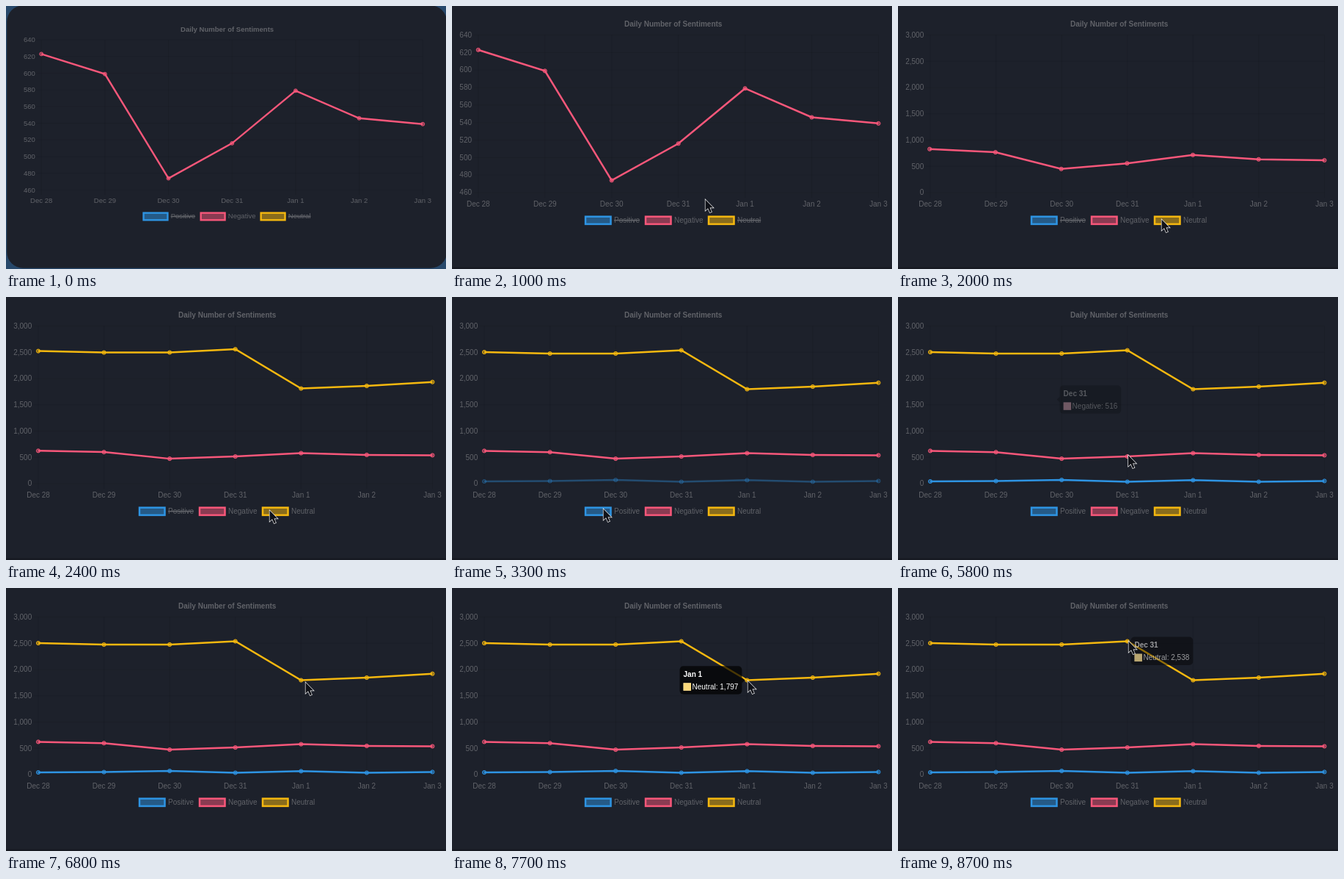
Write an HTML page with a canvas that moves like this. It is 600 px wide and 358 px high and loops after 8800 ms.

```html
<!DOCTYPE html>
<html lang="en">
<head>
<meta charset="utf-8">
<title>Daily Number of Sentiments</title>
<style>
html, body { margin: 0; width: 100%; height: 100%; overflow: hidden; background: #1d212b; }
canvas { display: block; width: 600px; height: 358px; }
</style>
</head>
<body>
<canvas id="stage" width="600" height="358"></canvas>
<script>
const ctx = document.getElementById('stage').getContext('2d');
const LOOP = 8800, STEP = 100;
const SHOW_NEUTRAL = 1560, SHOW_POSITIVE = 3190;
const TOP = 39.5, BOTTOM = 254, RIGHT = 581.5;
const FONT = '10px "Liberation Sans", Arial, sans-serif';
const TEXT = '#616369';

const days = ['Dec 28', 'Dec 29', 'Dec 30', 'Dec 31', 'Jan 1', 'Jan 2', 'Jan 3'];
const positive = { name: 'Positive', rgb: '46,148,227', x: 181, shownAt: SHOW_POSITIVE,
  values: [42, 48, 70, 35, 65, 35, 50] };
const negative = { name: 'Negative', rgb: '248,87,122', x: 263, shownAt: -Infinity,
  values: [623, 599, 474, 516, 579, 546, 539] };
const neutral = { name: 'Neutral', rgb: '245,184,15', x: 349, shownAt: SHOW_NEUTRAL,
  values: [2503, 2475, 2476, 2538, 1797, 1846, 1920] };
const series = [positive, negative, neutral];

const narrow = { min: 460, max: 640, step: 20, left: 35.8 };
const wide = { min: 0, max: 3000, step: 500, left: 44 };

// Pointer stops: time, x, y
const pointerPath = [
  [600, 333, 232], [1000, 345, 263], [1400, 359, 290], [2500, 359, 290],
  [3000, 206, 288], [4350, 206, 288], [5000, 44, 75], [5250, 44, 75],
  [5400, 134, 77], [5540, 134, 77], [5745, 313.5, 215], [6350, 313.5, 215],
  [6800, 408, 128], [6900, 403, 126], [8250, 403, 126], [8583, 314, 72]
];
const hovers = [
  { from: 5000, to: 5250, set: neutral, day: 0 },
  { from: 5400, to: 5545, set: neutral, day: 1 },
  { from: 5745, to: 6350, set: negative, day: 3 },
  { from: 6900, to: 8250, set: neutral, day: 4 },
  { from: 8583, to: LOOP, set: neutral, day: 3 }
];

const clamp = v => Math.min(1, Math.max(0, v));
const mix = (a, b, p) => a + (b - a) * p;
const smooth = p => p * p * (3 - 2 * p);
const outQuart = p => 1 - (1 - clamp(p)) ** 4;
const color = (set, alpha = 1) => `rgba(${set.rgb},${alpha})`;
const scaleX = (scale, day) => mix(scale.left, RIGHT, day / 6);
const scaleY = (scale, v) => mix(BOTTOM, TOP, (v - scale.min) / (scale.max - scale.min));

function text(str, x, y, align = 'left', fill = TEXT, bold = false) {
  ctx.font = (bold ? 'bold ' : '') + FONT;
  ctx.textAlign = align;
  ctx.textBaseline = 'middle';
  ctx.fillStyle = fill;
  ctx.fillText(str, x, y + 0.5);
}

function segment(x1, y1, x2, y2, stroke, width) {
  ctx.strokeStyle = stroke;
  ctx.lineWidth = width;
  ctx.beginPath();
  ctx.moveTo(x1, y1);
  ctx.lineTo(x2, y2);
  ctx.stroke();
}

function drawAxes(scale) {
  const grid = 'rgba(0,0,0,.1)';
  for (let v = scale.min; v <= scale.max; v += scale.step) {
    const y = scaleY(scale, v);
    segment(scale.left - 7, y, RIGHT, y, grid, 0.85);
    text(v.toLocaleString('en-US'), scale.left - 8.8, y, 'right');
  }
  days.forEach((day, i) => {
    const x = scaleX(scale, i);
    segment(x, TOP, x, BOTTOM + 7, grid, 0.85);
    text(day, x, 269.5, 'center');
  });
}

function drawLegend(t) {
  for (const set of series) {
    ctx.fillStyle = color(set, 0.5);
    ctx.strokeStyle = color(set);
    ctx.lineWidth = 2.5;
    ctx.fillRect(set.x + 1, 286.7, 34.5, 10.2);
    ctx.strokeRect(set.x + 1, 286.7, 34.5, 10.2);
    text(set.name, set.x + 40, 291.5);
    if (t < set.shownAt) {
      const end = set.x + 40 + ctx.measureText(set.name).width;
      segment(set.x + 40, 291.8, end, 291.8, TEXT, 1.6);
    }
  }
}

function drawSeries(set, t) {
  if (t < set.shownAt) return;
  const move = outQuart((t - SHOW_NEUTRAL) / 1000);
  const alpha = outQuart((t - set.shownAt) / 1000);
  const points = set.values.map((v, i) => [
    mix(scaleX(narrow, i), scaleX(wide, i), move),
    mix(scaleY(narrow, v), scaleY(wide, v), move)
  ]);
  ctx.save();
  ctx.beginPath();
  ctx.rect(0, TOP - 1.3, 600, BOTTOM - TOP + 2.6);
  ctx.clip();
  ctx.strokeStyle = color(set, alpha);
  ctx.lineWidth = 2.5;
  ctx.beginPath();
  points.forEach(([x, y]) => ctx.lineTo(x, y));
  ctx.stroke();
  ctx.restore();

  ctx.fillStyle = color(set, alpha / 2);
  ctx.strokeStyle = color(set, alpha);
  ctx.lineWidth = 0.9;
  for (const [x, y] of points) {
    if (y < TOP - 1) continue;
    ctx.beginPath();
    ctx.arc(x, y, 2.6, 0, Math.PI * 2);
    ctx.fill();
    ctx.stroke();
  }
}

function tooltipBox({ set, day }) {
  const label = `${set.name}: ${set.values[day].toLocaleString('en-US')}`;
  ctx.font = FONT;
  const w = ctx.measureText(label).width + 22, h = 38.5;
  const onRight = day <= 3;
  const x = scaleX(wide, day) + (onRight ? 7 : -7 - w);
  return { label, w, h, onRight, x, y: scaleY(wide, set.values[day]) - h / 2 };
}

function drawTooltip(t) {
  const index = hovers.findLastIndex(h => t >= h.from);
  if (index < 0) return;
  const hover = hovers[index];
  const opacity = clamp((t - hover.from) / 200) * clamp(1 - (t - hover.to) / 200);
  if (!opacity) return;

  const box = tooltipBox(hover);
  const start = index ? tooltipBox(hovers[index - 1]) : box;
  const p = outQuart((t - hover.from) / 400);
  const x = mix(start.x, box.x, p), y = mix(start.y, box.y, p);
  const edge = box.onRight ? x : x + box.w, dir = box.onRight ? -1 : 1;

  ctx.save();
  ctx.globalAlpha = opacity;
  ctx.fillStyle = 'rgba(0,0,0,.7)';
  ctx.beginPath();
  ctx.roundRect(x, y, box.w, box.h, 5);
  ctx.fill();
  ctx.beginPath();
  ctx.moveTo(edge, y + box.h / 2 - 4);
  ctx.lineTo(edge + dir * 4, y + box.h / 2);
  ctx.lineTo(edge, y + box.h / 2 + 4);
  ctx.fill();
  text(days[hover.day], x + 5, y + 11, 'left', '#fff', true);
  ctx.fillStyle = '#fff';
  ctx.fillRect(x + 5, y + 23, 10.5, 10.5);
  ctx.fillStyle = color(hover.set, 0.55);
  ctx.fillRect(x + 5, y + 23, 10.5, 10.5);
  text(box.label, x + 17, y + 28, 'left', '#fff');
  ctx.restore();
}

function drawPointer(t) {
  if (t < pointerPath[0][0]) return;
  const i = pointerPath.findLastIndex(k => t >= k[0]);
  const a = pointerPath[i], b = pointerPath[i + 1] || a;
  const p = b === a ? 0 : smooth((t - a[0]) / (b[0] - a[0]));
  ctx.save();
  ctx.translate(mix(a[1], b[1], p), mix(a[2], b[2], p));
  ctx.fillStyle = '#101218';
  ctx.strokeStyle = '#fff';
  ctx.lineWidth = 1.3;
  ctx.stroke(arrow);
  ctx.fill(arrow);
  ctx.restore();
}
const arrow = new Path2D('M.5 .5V15.5L4 12.3 6.6 18.2 9 17.1 6.5 11.5H11.3Z');

function draw(t) {
  const zoom = smooth(clamp(t / 1000));
  const size = mix(0.953, 1, zoom);
  const scale = t < SHOW_NEUTRAL ? narrow : wide;

  ctx.fillStyle = '#27486b';
  ctx.fillRect(0, 0, 600, 358);
  ctx.save();
  ctx.translate(300, 179);
  ctx.scale(size, size);
  ctx.translate(-300, -179);

  ctx.fillStyle = '#1d212b';
  ctx.beginPath();
  ctx.roundRect(-13.5, -9.5, 629.5, 375, 23);
  ctx.fill();
  text('Daily Number of Sentiments', 301.7, 25, 'center', TEXT, true);
  drawAxes(scale);
  drawLegend(t);
  [neutral, negative, positive].forEach(set => drawSeries(set, t));
  drawTooltip(t);
  drawPointer(t);
  ctx.restore();

  ctx.fillStyle = `rgba(20,23,30,${zoom * 0.7})`;
  ctx.fillRect(0, 355.5, 600, 2.5);
}

const began = performance.now();
function tick() {
  const t = (performance.now() - began) % LOOP;
  draw(Math.floor(t / STEP) * STEP);
  requestAnimationFrame(tick);
}
tick();
</script>
</body>
</html>
```
